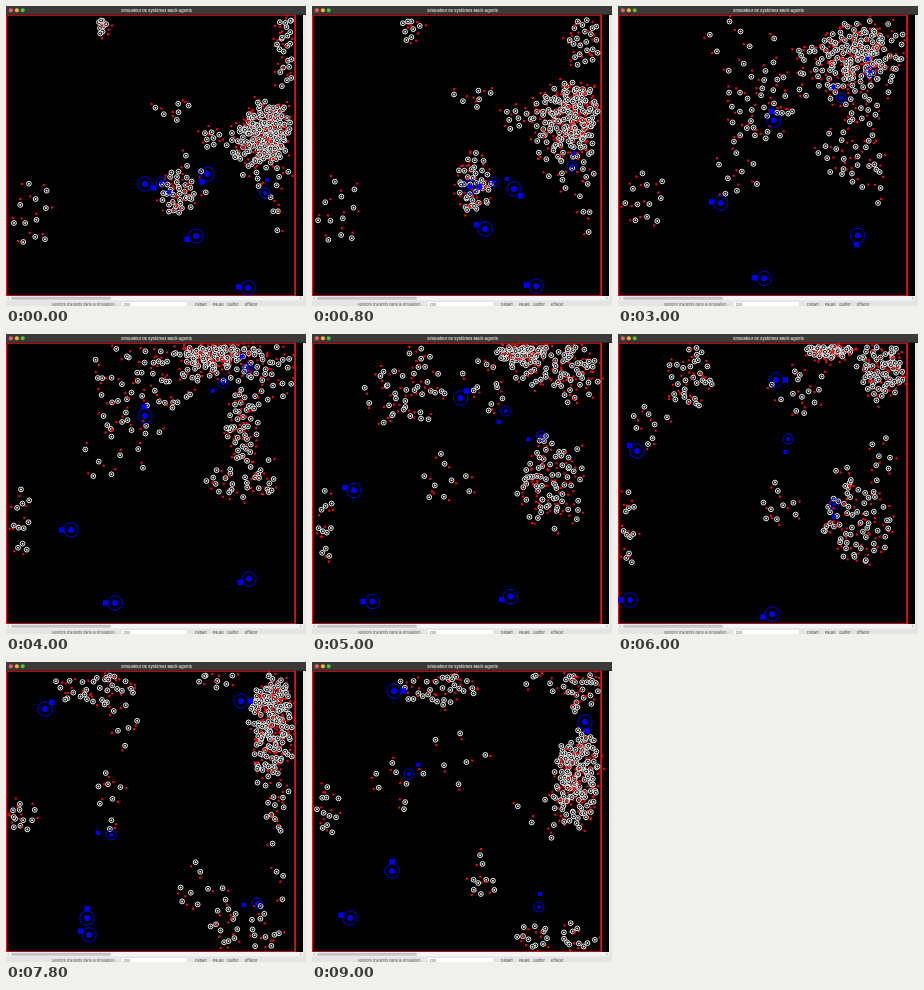
Animation of 300 by 300 pixels, one loop 9.2 s. Source, as an HTML page with a canvas:

```html
<!DOCTYPE html>
<html lang="fr">
<head>
<meta charset="utf-8">
<style>
  html, body { margin: 0; width: 100%; height: 100%; overflow: hidden; background: #000; }
  canvas, svg { position: absolute; left: 0; top: 0; width: 300px; height: 300px; }
  text { font-family: Inter, "Liberation Sans", sans-serif; }
</style>
</head>
<body>
<canvas></canvas>
<svg viewBox="0 0 300 300">
  <rect width="300" height="8.6" fill="#3b3a39"/>
  <circle cx="4.9" cy="4.2" r="2" fill="#f4605a"/>
  <circle cx="10.9" cy="4.2" r="2" fill="#f0b73a"/>
  <circle cx="16.7" cy="4.2" r="2" fill="#4fc148"/>
  <text x="150.5" y="5.7" font-size="3.9" font-weight="600" fill="#e4e4e4" text-anchor="middle">Simulateur de Systèmes Multi-Agents</text>

  <rect x="297" y="9" width="3" height="291" fill="#e9e9e9"/>
  <rect y="290" width="300" height="10" fill="#e4e4e4"/>
  <rect y="290" width="297" height="4.5" fill="#f3f3f3"/>
  <rect x="5" y="290.7" width="100" height="3" rx="1.5" fill="#c4c4c4"/>
  <path d="M3 291l-1.5 1.2 1.5 1.2M294 291l1.5 1.2-1.5 1.2" fill="none" stroke="#888" stroke-width=".5"/>
  <rect x="116" y="296" width="65" height="4" fill="#fff"/>
  <g font-size="3.7" fill="#555">
    <text x="46" y="300">Nombre d'agents dans la simulation :</text>
    <text x="117.5" y="299.5">200</text>
    <g fill="#444">
      <text x="189" y="299.5">Départ</text>
      <text x="207" y="299.5">Pause</text>
      <text x="221" y="299.5">Quitter</text>
      <text x="239" y="299.5">Effacer</text>
    </g>
  </g>
</svg>
<script>
const LOOP = 9200, STEP = 200;
const TIMES = [0, 800, 2200, 4000, 6000, 7800, 9000];
const canvas = document.querySelector('canvas');
const ctx = canvas.getContext('2d');
const scale = window.devicePixelRatio || 1;
canvas.width = canvas.height = 300 * scale;

let seed = 41;
const rand = () => (seed = (seed * 16807) % 2147483647) / 2147483647;

const flocks = [], hunters = [];

// path: centre x, centre y, half width, half height at each key time
function flock(count, ...path) {
  const agents = Array.from({ length: count }, (_, i) => ({
    r: Math.sqrt((i + 0.2 + 0.6 * rand()) / count),
    a: i * 2.39996 + rand() * 0.5,
    spin: (rand() - 0.5) * 0.16,
    turn: (rand() - 0.5) * 2.6,
    sway: rand() * 6.28,
    reach: 5 + rand() * 2
  }));
  flocks.push({ agents, path });
}

// path: x, y, heading in degrees at each key time
function hunter(big, ...path) { hunters.push({ big, path }); }

flock(55, 262,120,24,26, 262,105,24,30, 258,62,30,40, 208,22,28,13, 212,16,24,8, 266,50,20,38, 268,102,20,34);
flock(45, 250,138,30,24, 252,112,34,32, 250,75,45,36, 215,28,55,22, 262,34,24,26, 264,65,22,50, 264,115,22,45);
flock(40, 262,128,22,28, 258,120,38,40, 245,70,45,45, 236,92,16,38, 238,188,34,42, 268,95,18,75, 262,130,22,38);
flock(22, 255,150,32,32, 255,150,32,34, 232,150,36,38, 234,148,38,16, 242,175,36,55, 240,265,40,25, 245,275,45,16);
flock(22, 280,38,10,50, 272,35,16,28, 262,45,30,28, 262,40,26,35, 265,40,20,30, 268,60,18,50, 268,28,18,24);
flock(5, 270,200,6,30, 275,200,8,32, 250,205,28,30, 262,140,20,20, 268,118,16,20, 275,200,10,45, 235,155,35,25);
flock(30, 171,187,18,22, 162,176,18,30, 150,132,28,30, 130,60,45,45, 72,42,24,32, 88,25,44,18, 125,25,42,18);
flock(9, 180,175,22,28, 160,185,16,24, 128,200,14,32, 105,120,36,32, 160,170,20,24, 195,225,28,28, 171,216,13,26);
flock(11, 26,210,20,40, 26,208,22,40, 36,198,32,26, 16,188,9,40, 11,195,6,45, 15,155,16,16, 16,148,12,28);
flock(8, 96,20,5,9, 98,23,12,13, 120,42,45,24, 118,40,50,30, 30,92,26,20, 102,140,18,30, 85,125,40,25);
flock(6, 166,105,20,12, 160,92,22,12, 178,85,20,20, 175,40,35,30, 175,60,28,22, 118,62,14,28, 145,95,30,35);
flock(7, 205,132,10,10, 203,112,14,12, 210,80,14,24, 170,40,35,35, 185,55,25,25, 205,18,30,8, 230,20,40,10);

hunter(true, 139,178,24, 158,181,0, 169,140,-108, 139,82,-96, 158,46,0, 235,39,0, 273,60,77);
hunter(false, 155,176,51, 182,176,-13, 228,126,-51, 217,49,-217, 170,105,-259, 105,173,-171, 97,112,-45);
hunter(true, 201,168,122, 202,183,45, 237,217,49, 243,245,160, 154,280,162, 83,273,204, 38,256,198);
hunter(true, 190,230,160, 173,223,207, 133,198,193, 65,196,180, 19,117,216, 39,47,315, 82,29,360);
hunter(true, 242,282,187, 224,280,186, 176,275,186, 109,269,180, 12,266,180, 81,256,270, 80,209,270);
hunter(false, 259,187,-81, 260,160,-80, 260,91,-86, 242,34,-119, 216,170,-270, 251,241,-189, 227,245,-86);

function sample(path, size, t) {
  let k = 0;
  while (k < TIMES.length - 2 && t >= TIMES[k + 1]) k++;
  const f = (t - TIMES[k]) / (TIMES[k + 1] - TIMES[k]);
  return Array.from({ length: size }, (_, j) => {
    const a = path[k * size + j], b = path[(k + 1) * size + j];
    return a + (b - a) * f;
  });
}

const bounce = (v, lo, hi) => v < lo ? 2 * lo - v : v > hi ? 2 * hi - v : v;

function disc(x, y, r) {
  ctx.beginPath();
  ctx.arc(x, y, r, 0, 7);
  ctx.fill();
}

function ring(x, y, r, width) {
  ctx.lineWidth = width;
  ctx.beginPath();
  ctx.arc(x, y, r, 0, 7);
  ctx.stroke();
}

function square(x, y, size) { ctx.fillRect(x - size / 2, y - size / 2, size, size); }

function drawFlock({ agents, path }, t) {
  const [cx, cy, rx, ry] = sample(path, 4, t);
  const [nx, ny] = sample(path, 4, Math.min(t + 400, 9000));
  const [px, py] = sample(path, 4, Math.max(t - 400, 0));
  const course = Math.atan2(ny - py, nx - px);
  for (const g of agents) {
    const a = g.a + g.spin * t / 1000;
    const x = bounce(cx + Math.cos(a) * g.r * rx, 4, 286);
    const y = bounce(cy + Math.sin(a) * g.r * ry, 13, 286);
    const h = course + g.turn + 0.5 * Math.sin(t / 900 + g.sway);
    ctx.fillStyle = '#f00a0a';
    square(x + Math.cos(h) * g.reach, y + Math.sin(h) * g.reach, 2.1);
    ctx.fillStyle = '#000';
    disc(x, y, 2.4);
    ctx.strokeStyle = ctx.fillStyle = '#f2f2f2';
    ring(x, y, 2.4, 1);
    disc(x, y, 1);
  }
}

function drawHunter({ big, path }, t) {
  const [x, y, deg] = sample(path, 3, t);
  const h = deg * Math.PI / 180, reach = big ? 9.4 : 13;
  ctx.strokeStyle = ctx.fillStyle = '#0000f5';
  ring(x, y, big ? 7.2 : 5, 0.9);
  disc(x, y, big ? 2.9 : 2);
  square(x + Math.cos(h) * reach, y + Math.sin(h) * reach, big ? 5.4 : 4);
}

function draw(t) {
  ctx.setTransform(scale, 0, 0, scale, 0, 0);
  ctx.fillStyle = '#000';
  ctx.fillRect(0, 0, 300, 300);
  ctx.fillStyle = '#e0101c';
  ctx.fillRect(0, 8.6, 290, 1.2);
  ctx.fillRect(0, 8.6, 1.1, 282);
  ctx.fillRect(288.2, 8.6, 1.9, 282);
  ctx.fillRect(0, 289.2, 290, 0.8);
  flocks.forEach(f => drawFlock(f, t));
  hunters.forEach(p => drawHunter(p, t));
}

const start = performance.now();
function tick() {
  const t = Math.max(0, performance.now() - start) % LOOP;
  draw(Math.floor(t / STEP) * STEP);
  requestAnimationFrame(tick);
}
tick();
</script>
</body>
</html>
```
